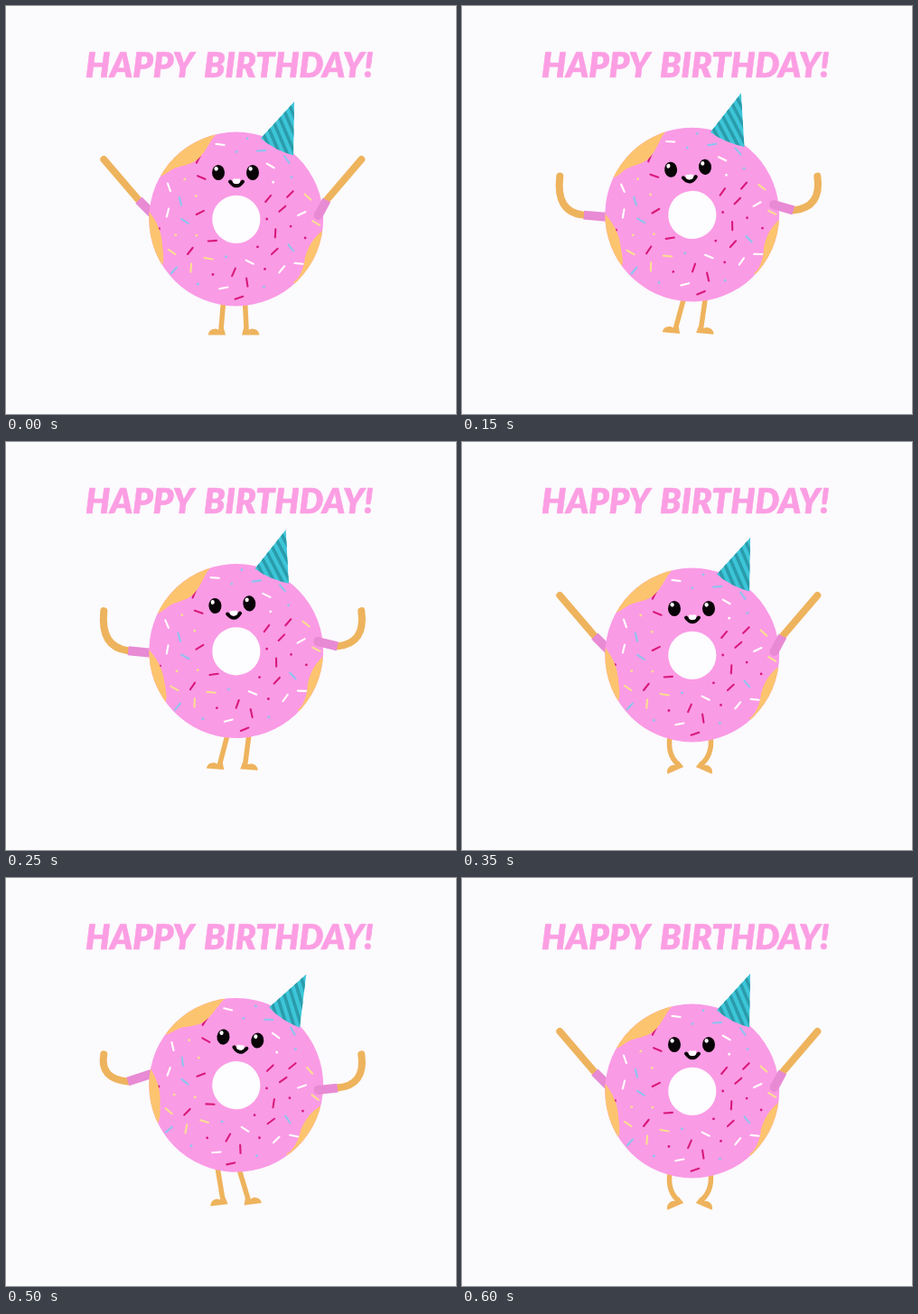
Recreate the animation shown at these times as an HTML page with a canvas. Size 498 px wide and 452 px high, loop 0.65 s.

```html
<!DOCTYPE html>
<html lang="en">
<head>
<meta charset="utf-8">
<title>Happy Birthday</title>
<style>
html, body { margin: 0; width: 100%; height: 100%; overflow: hidden; background: #fbfafd; }
canvas, svg { position: absolute; left: 0; top: 0; display: block; }
text { font: italic 900 37.6px Lato, "Open Sans", sans-serif; fill: #fc9ee3; stroke: #fc9ee3; stroke-width: .6; stroke-linejoin: round; }
</style>
</head>
<body>
<canvas id="stage" width="498" height="452"></canvas>
<svg width="498" height="452"><text x="88" y="78.5">HAPPY <tspan x="219">BIRTHDAY!</tspan></text></svg>
<script>
const ctx = document.getElementById('stage').getContext('2d');
const CX = 254.7, CY = 236, R = 96.4;
const PINK = '#fa9be5', DOUGH = '#fcc46f', LIMB = '#eeb35d', SLEEVE = '#e88ad4', INK = '#080307';
const SPRINKLES = ['#ffffff', '#d91a7b', '#8dc3ee', '#fbdd91', '#d91a7b'];
const LOOP = 650, STEP = 50;

const clamp = v => Math.max(0, Math.min(1, v));
const mix = (a, b, k) => a + (b - a) * k;

// Eased rise to the top and fall back to the ground.
function hop(t, from, top, to, height) {
  const k = clamp(Math.min((t - from) / (top - from), (to - t) / (to - top)));
  return height * Math.sin(k * Math.PI / 2) ** 1.25;
}

function poseAt(t) {
  const first = hop(t, 0, 200, 350, 5.4);
  const second = hop(t, 350, 475, 600, 7.1);
  const rise = first + second;
  const tilt = (second - first) * .9;
  const crouch = t > 200 && t <= 600 ? clamp(1 - rise / 4.5) : 0;
  return { rise, tilt, angle: tilt * Math.PI / 180, crouch, lift: clamp(rise / 4.6) };
}

// A point fixed to the body, given from its centre.
function onBody({ rise, angle }, x, y) {
  const c = Math.cos(angle), s = Math.sin(angle);
  return [CX + x * c - y * s, CY - rise + x * s + y * c];
}

function fill(color, d) {
  ctx.fillStyle = color;
  ctx.fill(new Path2D(d));
}

function ellipse(color, x, y, rx, ry = rx) {
  ctx.fillStyle = color;
  ctx.beginPath();
  ctx.ellipse(x, y, rx, ry, 0, 0, 7);
  ctx.fill();
}

function curve(color, width, [x0, y0], [cx, cy], [x1, y1], cap = 'round') {
  ctx.strokeStyle = color;
  ctx.lineWidth = width;
  ctx.lineCap = cap;
  ctx.beginPath();
  ctx.moveTo(x0, y0);
  ctx.quadraticCurveTo(cx, cy, x1, y1);
  ctx.stroke();
}

function arm(pose, side) {
  const { rise, tilt, lift } = pose;
  // The right arm bends ahead of the left one.
  const bend = side > 0 ? clamp(lift * 2.7) : lift * lift;
  const tip = [250.8 + 142.5 * side, 170 + 3.8 * rise];
  const elbow = [250.8 + (104 + 12 * bend) * side, 215 + 14 * lift + .6 * side * tilt];
  const corner = [
    mix((tip[0] + elbow[0]) / 2, tip[0] + 5 * side, bend),
    mix((tip[1] + elbow[1]) / 2, elbow[1] - 3, bend)
  ];
  const shoulder = onBody(pose, 91 * side, -4);
  curve(LIMB, 8, tip, corner, elbow);
  curve(SLEEVE, 10, elbow, elbow, shoulder, 'butt');
  ellipse(SLEEVE, ...shoulder, 5);
}

function leg(pose, side) {
  const { rise, tilt, crouch } = pose;
  const hip = onBody(pose, -2 + (11.5 + 10 * crouch) * side, 84);
  const ankle = [252 + .3 * tilt + 14 * side, 358 - 2 * crouch - .4 * rise];
  const knee = [
    (hip[0] + ankle[0]) / 2 + 9 * crouch * side,
    (hip[1] + ankle[1]) / 2 + 6 * crouch
  ];
  curve(LIMB, 5.5, hip, knee, ankle);
  ctx.save();
  ctx.translate(...ankle);
  ctx.scale(side, 1);
  ctx.rotate(.42 * crouch - .02 * side * tilt);
  fill(LIMB, 'M-3-1L-5 6.5H14.5Q13.5-.5 6-.5Q1 2 0-1Z');
  ctx.restore();
}

function randomFrom(seed) {
  return () => (seed = seed * 16807 % 2147483647) / 2147483647;
}

// Spread by the golden angle, leaving the face free.
function sprinkles() {
  const random = randomFrom(41);
  for (let i = 0; i < 58; i++) {
    const r = Math.sqrt(mix(34 ** 2, 90 ** 2, i / 57)), turn = i * 2.39996;
    const x = CX + r * Math.cos(turn), y = CY + r * Math.sin(turn);
    const a = random() * Math.PI, color = SPRINKLES[Math.floor(random() * 5)];
    if (Math.abs(x - CX) < 33 && y > 170 && y < 208) continue;
    if (i % 3 === 0) {
      ellipse(color, x, y, 1.4);
    } else {
      const dx = 4.6 * Math.cos(a), dy = 4.6 * Math.sin(a);
      curve(color, 2.1, [x - dx, y - dy], [x, y], [x + dx, y + dy]);
    }
  }
}

function hat() {
  ctx.save();
  ctx.clip(new Path2D('M319 106L318 165.5Q296 159 282 146.5Z'));
  ctx.fillStyle = '#3cc5d8';
  ctx.fillRect(275, 100, 50, 70);
  for (let x = 250; x < 330; x += 8.5) {
    curve('#2a9cab', 3.6, [x, 100], [x + 15, 135], [x + 30, 170]);
  }
  ctx.restore();
}

function face() {
  for (const x of [235, 273]) {
    ellipse(INK, x, 184.5, 7, 8.6);
    ellipse('#fff', x - 2.4, 180.3, 2.1, 2.4);
  }
  curve(INK, 4, [248, 194.5], [255, 204], [262, 194.5]);
  fill('#fff', 'M251 191.5H259V195Q258.5 197 255 197Q251.5 197 251 195Z');
}

function donut() {
  ctx.save();
  ctx.beginPath();
  ctx.arc(CX, CY, R, 0, 7);
  ctx.clip();
  ctx.fillStyle = PINK;
  ctx.fillRect(150, 130, 210, 210);
  sprinkles();
  fill(DOUGH, 'M236 130L233 142C227 146 222 161 212 170C202 178 190 176 181 183Q176 187 168 190L160 130Z');
  fill(DOUGH, 'M150 222L158 227C166 238 172 248 173 264C174 275 176 282 171 292L150 300Z');
  fill(DOUGH, 'M360 245L350 249C342 256 336 262 331 278C330 290 325 302 318 306L335 330Z');
  ctx.restore();
  ellipse('#fdfcfe', 254.8, 236.3, 26.6);
  face();
  hat();
}

function draw(now) {
  const pose = poseAt(Math.floor(now % LOOP / STEP) * STEP);
  ctx.fillStyle = '#fbfafd';
  ctx.fillRect(0, 0, 498, 452);
  leg(pose, -1);
  leg(pose, 1);
  arm(pose, -1);
  ctx.save();
  ctx.translate(CX, CY - pose.rise);
  ctx.rotate(pose.angle);
  ctx.translate(-CX, -CY);
  donut();
  ctx.restore();
  arm(pose, 1);
}

const begin = performance.now();
function tick() {
  draw(performance.now() - begin);
  requestAnimationFrame(tick);
}
tick();
</script>
</body>
</html>
```
